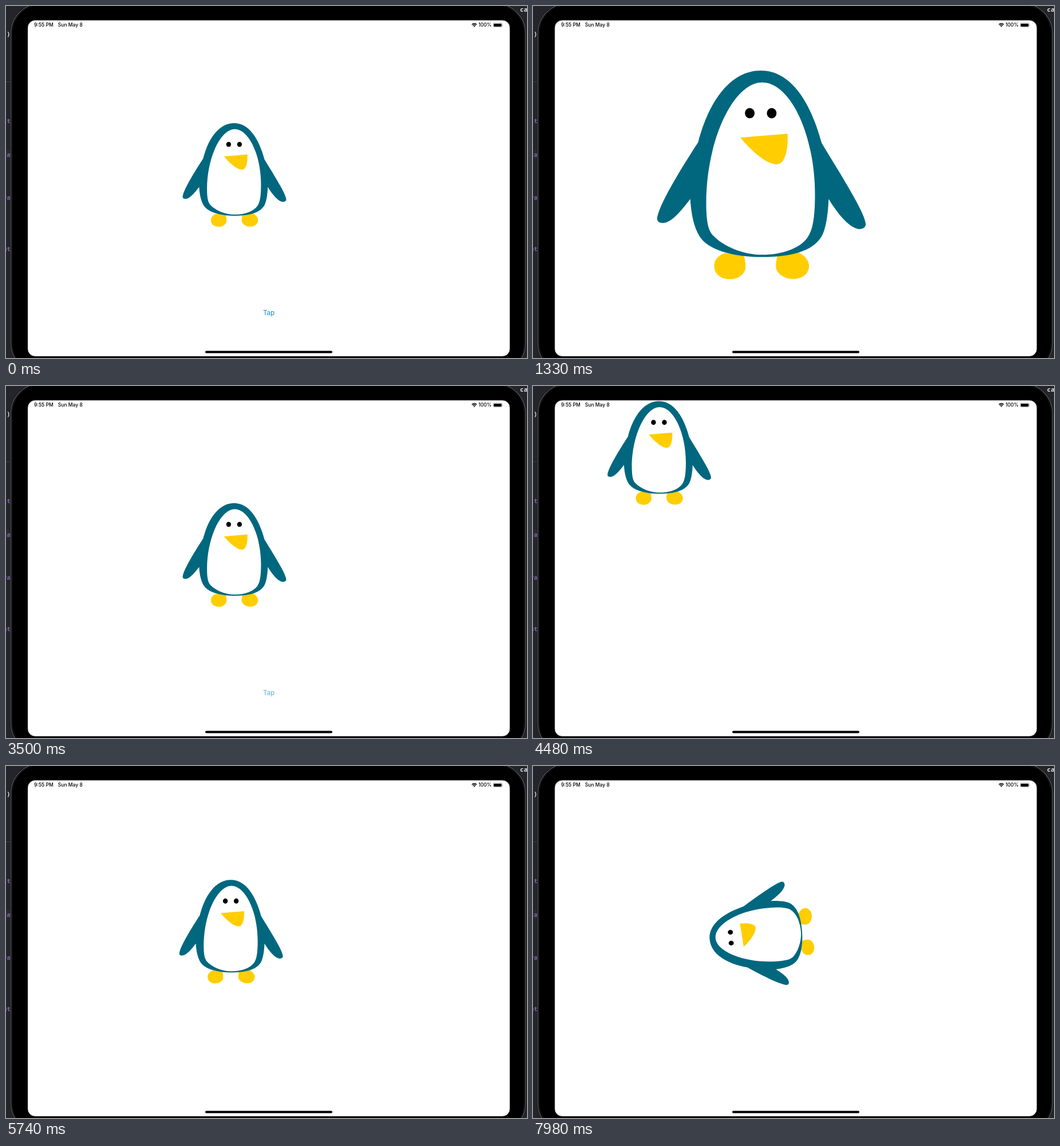
An HTML page for the animation above (8000 ms loop, 910 by 616 pixels).

```html
<!DOCTYPE html>
<html lang="en">
<head>
<meta charset="utf-8">
<title>Penguin springs</title>
<style>
  html, body { margin: 0; width: 100%; height: 100%; overflow: hidden; background: #24242b; }
  svg { display: block; width: 910px; height: 616px; }
  text { font-family: Inter, Roboto, sans-serif; }
  .code text { font: 600 11px "Noto Sans Mono", "DejaVu Sans Mono", monospace; text-anchor: end; }
  .status text { font-size: 8.5px; font-weight: 500; }
</style>
</head>
<body>
<svg viewBox="0 0 910 616">
  <defs>
    <clipPath id="screen"><rect x="38" y="25" width="842" height="588" rx="13"/></clipPath>
  </defs>

  <rect width="910" height="616" fill="#24242b"/>
  <path d="M0 132.5H10" stroke="#414149"/>
  <rect y="251" width="10" height="17" fill="#2b2833"/>
  <g class="code" fill="#7f67ad">
    <text x="7.5" y="53" fill="#dcdce0">)</text>
    <text x="8" y="205">it</text>
    <text x="8" y="264">ca</text>
    <text x="8" y="339">ra</text>
    <text x="8" y="429">nt</text>
    <text x="911" y="10" fill="#e4e4e8">ca</text>
  </g>

  <rect x="7" y="-6" width="902" height="650" rx="54" fill="#0c0c0d"/>
  <rect x="8.5" y="-4.5" width="899" height="647" rx="52.5" fill="#000" stroke="#505154" stroke-width="1.6"/>
  <rect x="10.7" y="-2.3" width="894.6" height="642.6" rx="50" fill="#000" stroke="#1d1d1f"/>
  <rect x="38" y="25" width="842" height="588" rx="13" fill="#fff" stroke="#555" stroke-width=".6"/>

  <g clip-path="url(#screen)">
    <text id="tap" x="459" y="540.6" font-size="11.6" text-anchor="middle">Tap</text>
    <g id="penguin">
      <g transform="scale(.4938) translate(-399 -295.8)">
        <g fill="#ffcd00">
          <path d="M335 433C322 438 316 446 316 456C316 470 328 479 344 479C360 479 371 468 371 458C371 450 370 443 368 438Z"/>
          <path d="M427 438C425 446 424 452 424.5 458C426 470 440 478.5 455 478.5C472 478.5 482.5 468 482.5 456C482.5 447 476 438 464 432Z"/>
        </g>
        <path fill="#00677f" d="M398 112C345 112 307 165 288 238C262 278 220 345 216 371C215 379 222 381 228 380C243 378 262 354 274 338C276 368 281 388 290 403C305 428 350 440 400 440C450 440 490 430 505 403C513 388 516 362 517 338C528 356 550 388 570 391C577 391 583 388 582 381C580 360 535 290 505 240C484 162 448 112 398 112Z"/>
        <path fill="#fff" d="M400 133C350 133 302 235 302 345C302 378 306 394 314 402C332 421 366 436 400 436C437 436 466 424 479 407C489 394 493 372 493 330C493 225 450 133 400 133Z"/>
        <path fill="#ffcd00" d="M362 230L445 223C446 250 441 275 427 277C408 278 380 252 362 230Z"/>
        <ellipse cx="378.5" cy="187" rx="8.5" ry="9"/>
        <ellipse cx="417" cy="187" rx="8.5" ry="9"/>
      </g>
    </g>
  </g>

  <g class="status">
    <text x="49" y="36.3">9:55 PM</text>
    <text x="90.8" y="36.3">Sun May 8</text>
    <text x="848.3" y="36.3" text-anchor="end">100%</text>
    <g fill="none" stroke="#000" stroke-width="1.4">
      <path d="M813.7 32.4Q818 28.4 822.3 32.4M815.3 34.2Q818 31.8 820.7 34.2"/>
    </g>
    <path d="M816.4 35.3Q818 34 819.6 35.3L818 37Z"/>
    <rect x="850.9" y="29.9" width="15.6" height="7" rx="2" fill="none" stroke="#888" stroke-width=".7"/>
    <rect x="851.9" y="30.9" width="13.6" height="5" rx="1.1"/>
    <path d="M867.4 32.2Q868.6 33.4 867.4 34.6Z" fill="#888"/>
  </g>
  <rect x="348" y="603.4" width="222" height="4" rx="2"/>
</svg>

<script>
  const LOOP = 8000, STEP = 70, DURATION = 1000;
  const SHIFT = -180.4;
  const tap = document.getElementById('tap');
  const penguin = document.getElementById('penguin');

  const rest = { scale: 1, shift: 0, angle: 0 };
  // Touch down, touch up (starts the spring), and the poses it runs between
  const moves = [
    { down: 630,  start: 769,  from: rest, to: { ...rest, scale: 2 } },
    { down: 2100, start: 2185, from: { ...rest, scale: 2 }, to: rest },
    { down: 3500, start: 3590, from: rest, to: { ...rest, shift: SHIFT } },
    { down: 4900, start: 5030, from: { ...rest, shift: SHIFT }, to: rest },
    { down: 6440, start: 6527, from: rest, to: { ...rest, angle: 180 } },
    { down: 7840, start: 7898, from: { ...rest, angle: 180 }, to: { ...rest, angle: 360 } }
  ];

  // Underdamped spring: damping ratio 0.5, initial velocity 5, settled after one second
  function spring(ms) {
    if (ms <= 0) return 0;
    if (ms >= DURATION) return 1;
    const decay = 4.6, freq = decay * Math.sqrt(3), velocity = 5;
    const s = ms / 1000, phase = freq * s;
    return 1 - Math.exp(-decay * s) *
      (Math.cos(phase) + (decay - velocity) / freq * Math.sin(phase));
  }

  function draw(time) {
    const t = Math.floor(time / STEP) * STEP;
    const move = moves.filter(m => t >= m.down).pop();
    const since = move ? t - move.start : -1;
    const { from, to } = move || { from: rest, to: rest };
    const p = spring(since);
    const mix = key => from[key] + (to[key] - from[key]) * p;

    const d = mix('shift');
    penguin.setAttribute('transform',
      `translate(${399 + d} ${295.8 + d}) rotate(${mix('angle')}) scale(${mix('scale')})`);

    const hidden = since >= 0 && since < DURATION;
    tap.setAttribute('visibility', hidden ? 'hidden' : 'visible');
    tap.setAttribute('fill', move && since < 0 ? '#57b5d5' : '#1489c5');
  }

  const origin = performance.now();
  function tick() {
    draw((performance.now() - origin) % LOOP);
    requestAnimationFrame(tick);
  }
  tick();
</script>
</body>
</html>
```
